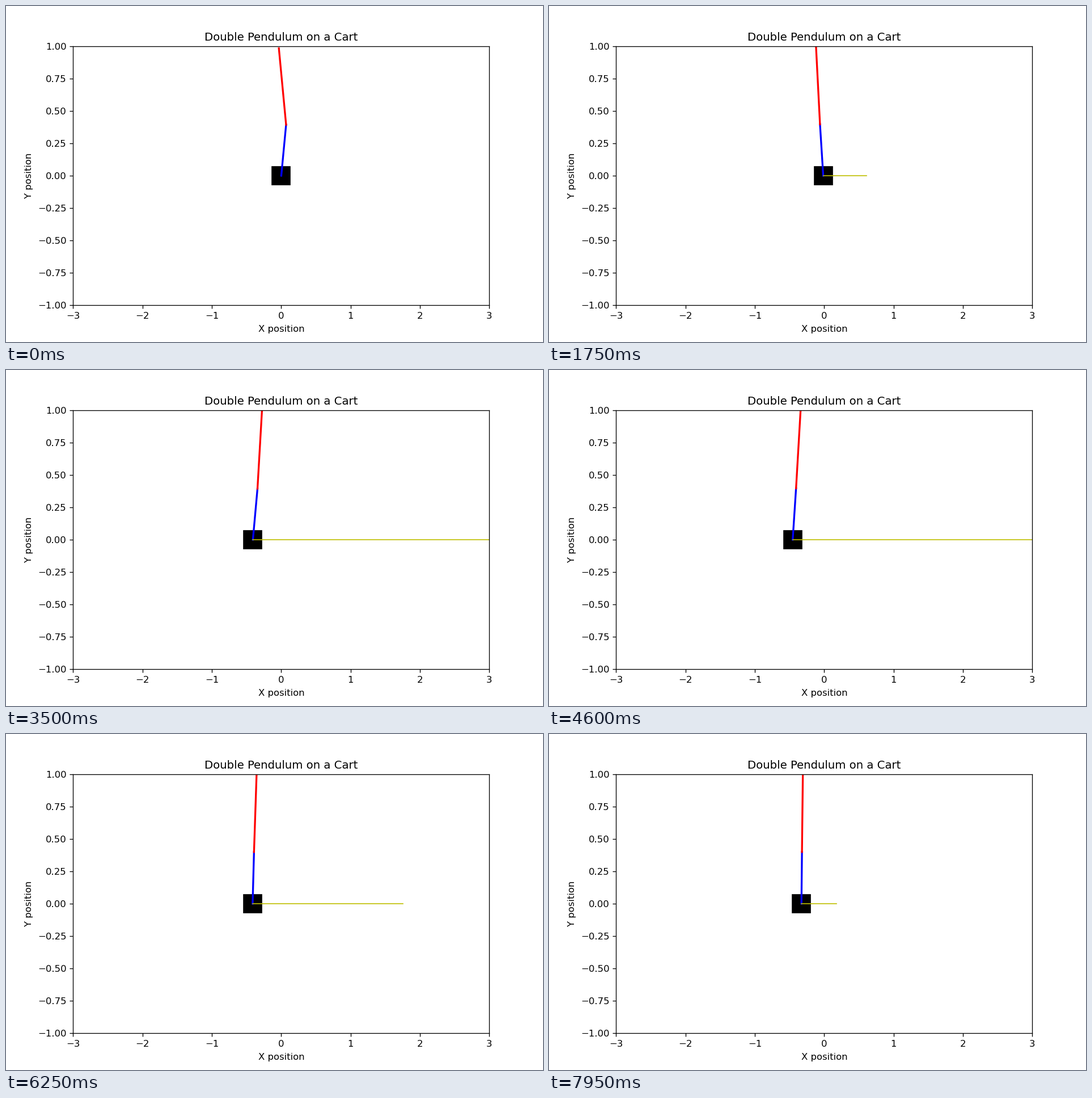
These frames come from a looping animation (947x592 px, 8000 ms). A matplotlib script:

```python
import numpy as np
import matplotlib.pyplot as plt
from matplotlib.animation import FuncAnimation

FRAMES, INTERVAL = 160, 50
L1, L2 = 0.4, 0.6

# A few poses of the run; everything between them is eased
KEY_STEPS = np.array([0, 18, 26, 35, 54, 70, 92, 125, 159])
CART_KEYS = np.array([0, 0.184, 0.133, -0.015, -0.292, -0.409, -0.455, -0.413, -0.329])
LOWER_KEYS = np.array([0.1745, -0.354, -0.335, -0.117, 0.143, 0.166, 0.121, 0.050, 0.019])
UPPER_KEYS = np.array([-0.1745, -0.177, -0.147, -0.095, 0.054, 0.107, 0.108, 0.062, 0.021])


def ease(t, values):
    """Cubic Hermite curve through the key poses, starting from rest."""
    slope = np.gradient(values, KEY_STEPS)
    slope[0] = 0
    i = np.searchsorted(KEY_STEPS[1:-1], t, side="right")
    h = KEY_STEPS[i + 1] - KEY_STEPS[i]
    u = (t - KEY_STEPS[i]) / h
    return ((1 + 2 * u) * (1 - u) ** 2 * values[i]
            + u * (1 - u) ** 2 * h * slope[i]
            + u ** 2 * (3 - 2 * u) * values[i + 1]
            + u ** 2 * (u - 1) * h * slope[i + 1])


def control_force(t):
    """Push right, pull back left, then push right with a fading force."""
    swing = 0.1345 * (t - 7.6) * (t - 34.83)
    left = FRAMES - 1 - t
    fade = 0.505 + 0.0364 * left + 0.000364 * left ** 2
    return np.minimum(swing, fade)


def pose(step):
    x = ease(step, CART_KEYS)
    lower, upper = ease(step, LOWER_KEYS), ease(step, UPPER_KEYS)
    joint = x + L1 * np.sin(lower), L1 * np.cos(lower)
    tip = joint[0] + L2 * np.sin(upper), joint[1] + L2 * np.cos(upper)
    return x, joint, tip


plt.rcParams.update({"axes.labelpad": 4.9, "xtick.major.pad": 4})
fig, ax = plt.subplots(figsize=(8, 5), dpi=118.4)
ax.set(xlim=(-3, 3), ylim=(-1, 1), title="Double Pendulum on a Cart",
       xlabel="X position", ylabel="Y position")

cart, = ax.plot([], [], "ks", markersize=19.5)
rod1, = ax.plot([], [], "b-", lw=2)
rod2, = ax.plot([], [], "r-", lw=2)
push, = ax.plot([], [], "y-", lw=1)


def update(step):
    x, joint, tip = pose(step)
    cart.set_data([x], [0])
    rod1.set_data([x, joint[0]], [0, joint[1]])
    rod2.set_data([joint[0], tip[0]], [joint[1], tip[1]])
    push.set_data([x, x + control_force(step)], [0, 0])
    push.set_visible(step > 0)
    return cart, rod1, rod2, push


anim = FuncAnimation(fig, update, frames=FRAMES, interval=INTERVAL,
                     repeat=True, repeat_delay=0, blit=False)
plt.show()
```
